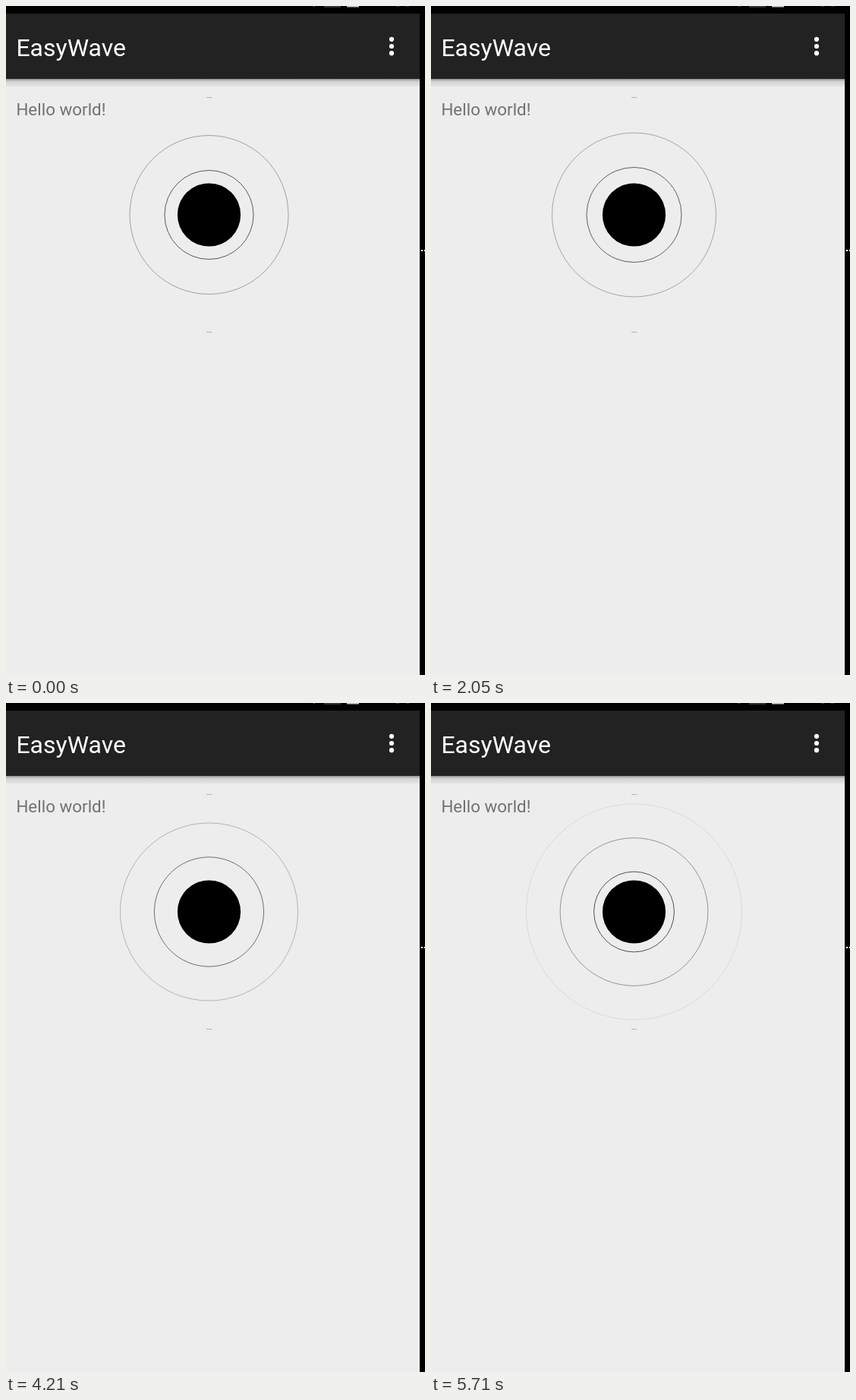
Recreate the animation shown at these times as an HTML page. Size 552 by 881 pixels, loop 5750 ms.

```html
<!DOCTYPE html>
<html lang="en">
<head>
<meta charset="utf-8">
<title>EasyWave</title>
<style>
  html, body { margin: 0; width: 100%; height: 100%; overflow: hidden; background: #000; }
  svg { display: block; }
  text { font-family: Roboto, sans-serif; }
</style>
</head>
<body>
<svg width="552" height="881" viewBox="0 0 552 881">
  <defs>
    <linearGradient id="shade" x1="0" y1="0" x2="0" y2="1">
      <stop offset="0" stop-color="#929292"/>
      <stop offset="0.35" stop-color="#d2d2d2"/>
      <stop offset="1" stop-color="#e4e4e4"/>
    </linearGradient>
  </defs>
  <rect width="552" height="881"/>
  <rect y="10" width="545" height="871" fill="#ededed"/>
  <rect y="10" width="545" height="86" fill="#222"/>
  <rect y="96" width="545" height="10" fill="url(#shade)"/>
  <g id="status">
    <rect x="419" width="22" height="2" fill="#333"/>
    <rect x="449" width="16" height="1.5" fill="#ccc"/>
    <rect x="405" width="2" height="1" fill="#555"/>
    <rect x="514" width="4" height="1" fill="#333"/>
    <rect x="527" width="4" height="1" fill="#333"/>
  </g>
  <g fill="#fff">
    <circle cx="508" cy="43.8" r="3.1"/>
    <circle cx="508" cy="53" r="3.1"/>
    <circle cx="508" cy="62.2" r="3.1"/>
    <rect x="547" y="321" width="2" height="2"/>
    <rect x="551" y="321" width="1" height="2"/>
  </g>
  <text x="13.4" y="65.5" font-size="32" fill="#fff">EasyWave</text>
  <text x="13.4" y="144" font-size="22.4" fill="#727272">Hello world!</text>
  <path d="M264 120.5h7M264 429.5h7" stroke="#b4b4b4"/>
  <g id="rings" fill="none" stroke="#000"></g>
  <circle cx="267.5" cy="275" r="41.6"/>
</svg>
<script>
const LOOP = 5750, SPEED = 0.0464, CORE = 41, REACH = 155, LAST = 145, WAVES = 8;

// Stretches of even refreshes: [count, ms each]
const pace = [[3, 150], [4, 120], [3, 150], [10, 134], [6, 138.3], [9, 130], [7, 141.4]];

const group = document.getElementById("rings");
const rings = Array.from({ length: WAVES }, () => {
  const ring = document.createElementNS("http://www.w3.org/2000/svg", "circle");
  ring.setAttribute("cx", 267.5);
  ring.setAttribute("cy", 275);
  return group.appendChild(ring);
});

// Time of the latest refresh
function refreshed(t) {
  let start = 0;
  for (const [count, hold] of pace) {
    const steps = Math.floor((t - start) / hold);
    if (steps < count) return start + steps * hold;
    start += count * hold;
  }
  return start;
}

// Radius of wave i at time zero; later waves start below zero, slightly closer together
const startRadius = i => 104.5 - 46.06 * i + 0.12 * i * i;

function draw(ms) {
  const travel = SPEED * refreshed(ms % LOOP);
  rings.forEach((ring, i) => {
    const r = startRadius(i) + travel;
    const shown = r > CORE && r < LAST;
    ring.setAttribute("r", shown ? r : 0);
    ring.setAttribute("stroke-opacity", shown ? 1 - r / REACH : 0);
  });
}

const begin = performance.now();
function frame() {
  draw(performance.now() - begin);
  requestAnimationFrame(frame);
}
draw(0);
requestAnimationFrame(frame);
</script>
</body>
</html>
```
